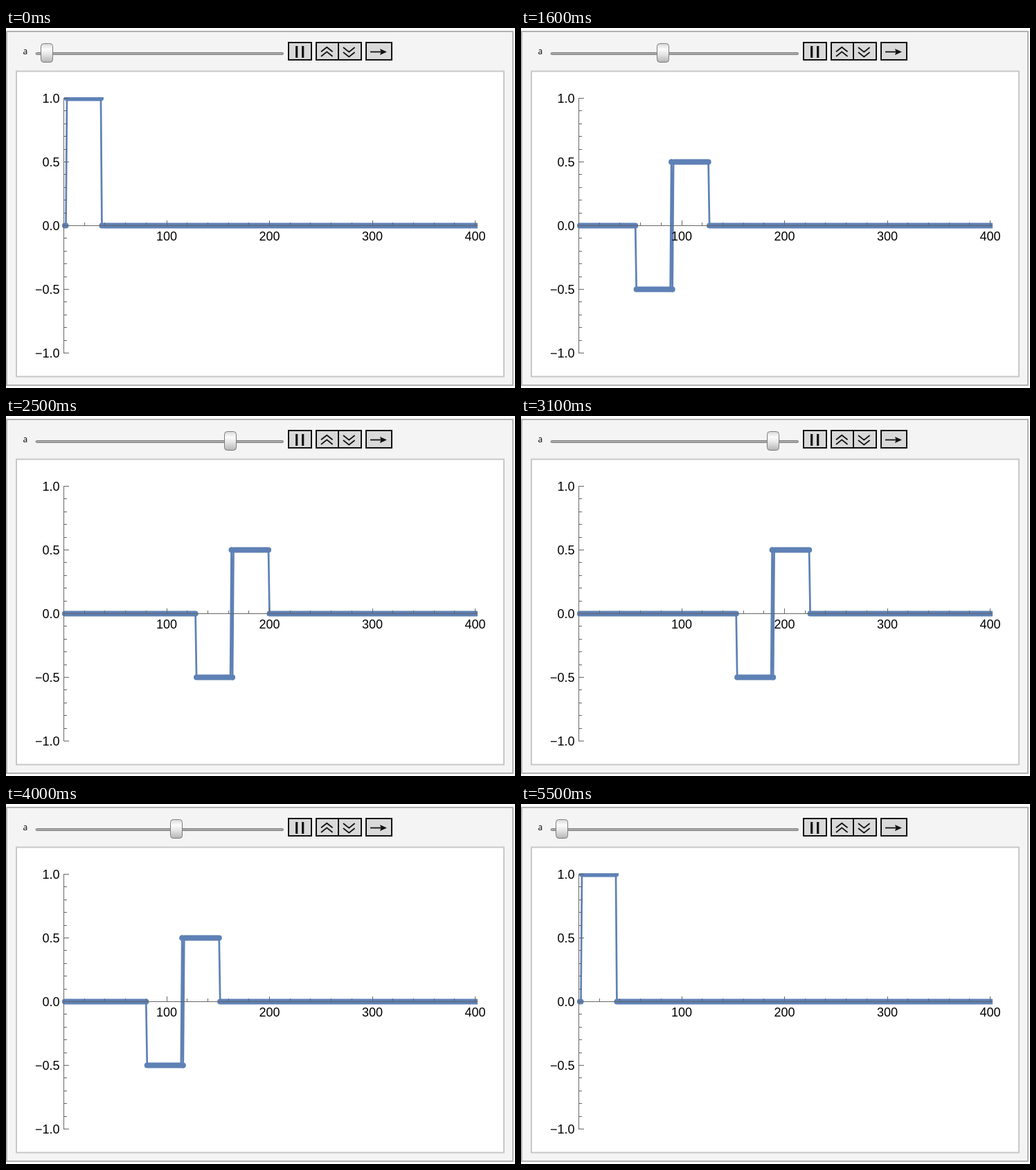
Write an HTML page that moves like this. It is 735x520 px and loops after 6 s.

```html
<!DOCTYPE html>
<html lang="en">
<head>
<meta charset="utf-8">
<title>Wave on a string</title>
<style>
  html, body { margin: 0; width: 100%; height: 100%; overflow: hidden; background: #fff; }
  svg { display: block; }
  .btn { fill: #d9d9d9; stroke: #111; stroke-width: 2; }
  .icon { fill: none; stroke: #111; stroke-width: 1.8; }
  .curve { fill: none; stroke: #5e81b5; stroke-linejoin: round; }
  #axes { fill: none; stroke: #666; }
  #labels { font: 18px "Liberation Sans", Arial, sans-serif; fill: #000; }
</style>
</head>
<body>
<svg width="735" height="520" viewBox="0 0 735 520">
  <defs>
    <linearGradient id="metal" x2="0" y2="1">
      <stop offset="0" stop-color="#d8d8d8"/>
      <stop offset=".3" stop-color="#fcfcfc"/>
      <stop offset=".6" stop-color="#e2e2e2"/>
      <stop offset="1" stop-color="#b4b4b4"/>
    </linearGradient>
    <clipPath id="area"><rect x="80" y="100" width="601" height="371"/></clipPath>
  </defs>

  <rect x="1" y="5" width="731" height="511" fill="#f4f4f4" stroke="#b2b2b2" stroke-width="2"/>
  <rect x="15" y="62.5" width="704" height="441" fill="#fff" stroke="#c8c8c8" stroke-width="2"/>

  <text x="24.5" y="38" font-size="12" font-family="Open Sans, Noto Sans, sans-serif">a</text>
  <rect x="43" y="35.5" width="357.5" height="3" rx="1.5" fill="#aaa" stroke="#808080"/>
  <rect id="thumb" x="-8.5" y="22.5" width="17" height="27" rx="4" fill="url(#metal)" stroke="#7c7c7c"/>

  <path class="btn" d="M408 21h33v25h-33zM448 21h65v25h-65zM480 21v25M520 21h37v25h-37z"/>
  <path class="icon" d="M419.7 26v17M428.7 26v17" style="stroke-width:3.2"/>
  <path class="icon" d="M455 34.3l8.3-6.6 8.3 6.6M455 41l8.3-6.6 8.3 6.6M487 28l8.3 6.6 8.3-6.6M487 35l8.3 6.6 8.3-6.6"/>
  <path class="icon" d="M526 34.5h17"/>
  <path d="M550 34.5l-10-4.5 1.5 4.5-1.5 4.5z" fill="#111"/>

  <g clip-path="url(#area)">
    <path id="line" class="curve" stroke-width="2.7"/>
    <path id="dots" class="curve" stroke-width="8.2" stroke-linecap="round"/>
  </g>
  <path id="axes"/>
  <g id="labels"></g>
</svg>

<script>
const $ = id => document.getElementById(id);
const px = x => 83.5 + 1.485 * x;
const py = y => 285.5 - 184 * y;
const crisp = v => Math.floor(v) + 0.5;

function label(text, x, y, anchor) {
  const el = document.createElementNS("http://www.w3.org/2000/svg", "text");
  el.setAttribute("x", x);
  el.setAttribute("y", y);
  el.setAttribute("text-anchor", anchor);
  el.textContent = text;
  $("labels").append(el);
}

function drawAxes() {
  let d = "M83.5 101V470M83 285.5H681";
  for (let x = 20; x <= 400; x += 20) {
    const major = x % 100 === 0;
    d += `M${crisp(px(x))} 285v${major ? -7 : -4}`;
    if (major) label(x, px(x), 307, "middle");
  }
  for (let i = -10; i <= 10; i++) {
    const major = i % 5 === 0;
    d += `M84 ${crisp(py(i / 10))}h${major ? 7 : 4}`;
    if (major) label((i / 10).toFixed(1).replace("-", "\u2212"), 77.5, py(i / 10) + 6, "end");
  }
  $("axes").setAttribute("d", d);
}

// Right-going wave, including the part reflected at the fixed end.
function wave(d) {
  if (d < -34 || d > 36) return 0;
  return d === 0 || d > 1 ? 0.5 : -0.5;
}
const height = (j, a) => wave(j - a) - wave(2 - j - a);

function drawCurve(a) {
  let line = "", dots = "";
  for (let j = 1; j <= 401; j++) {
    const v = height(j, a), x = px(j).toFixed(2), y = py(v);
    const before = v - height(j - 1, a), after = v - height(j + 1, a);
    // Sharp joins reach slightly past their point.
    const tip = j > 1 && before * after > 0 ? 3 * Math.sign(before) : 0;
    line += `${j > 1 ? "L" : "M"}${x} ${y - tip}`;
    dots += `M${x} ${y}h0`;
  }
  $("line").setAttribute("d", line);
  $("dots").setAttribute("d", dots);
  $("thumb").setAttribute("transform", `translate(${Math.floor(59.3 + 1.625 * a)} 0)`);
}

// Rest, sweep 0 to 200 and back, rest; sampled in 60 steps.
function valueAt(ms) {
  const t = 6 * Math.floor(ms / 100) / 59;
  return Math.round(200 * Math.max(0, 1 - Math.abs(t - 3) / 2.5));
}

let shown = -1;
function tick() {
  const a = valueAt(performance.now() % 6000);
  if (a !== shown) drawCurve(shown = a);
  requestAnimationFrame(tick);
}

drawAxes();
tick();
</script>
</body>
</html>
```
